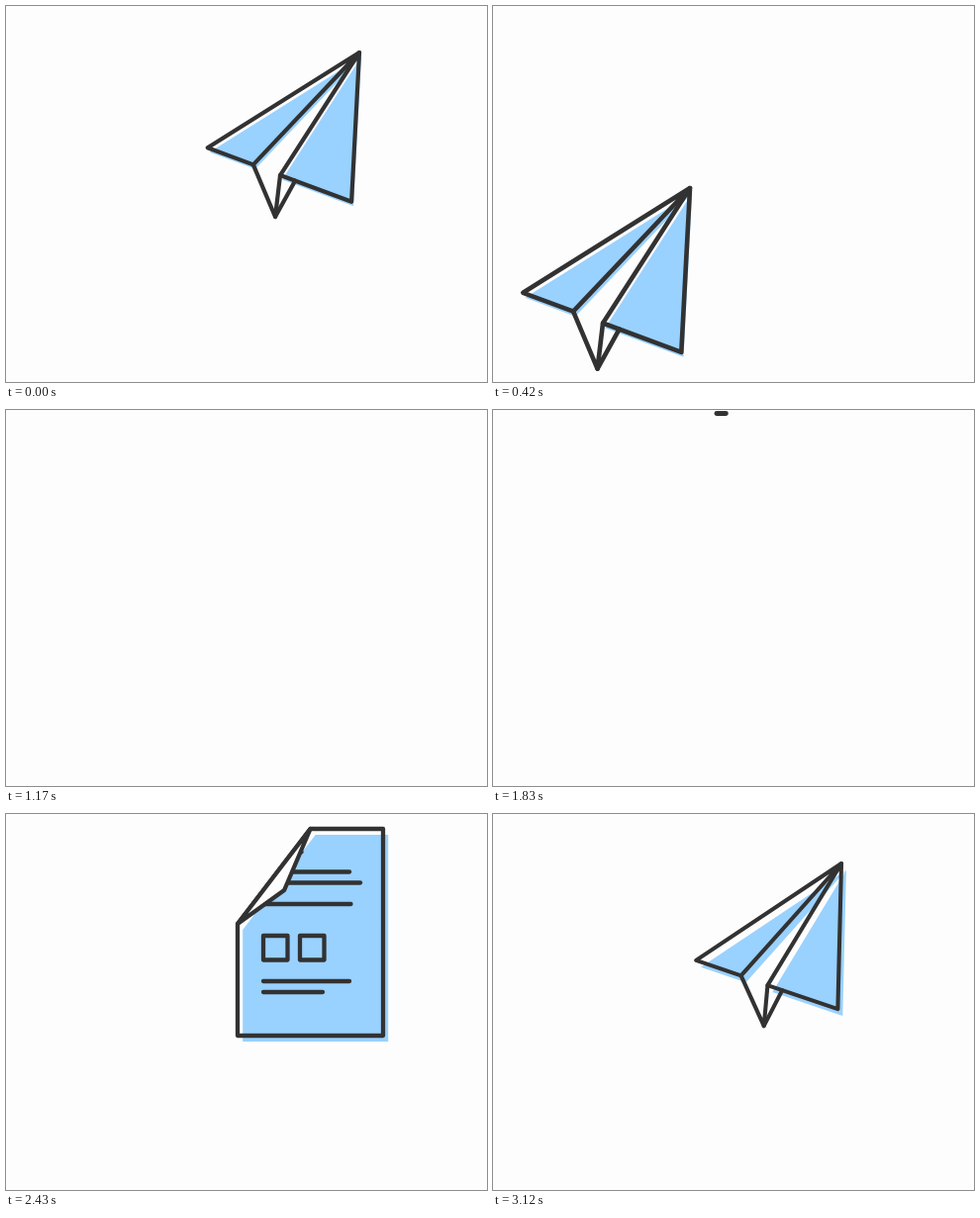
Recreate the animation shown at these times as an HTML page with a canvas. Size 486 by 380 pixels, loop 3.15 s.

```html
<!DOCTYPE html>
<html lang="en">
<head>
<meta charset="utf-8">
<title>Paper plane</title>
<style>
html, body { margin: 0; height: 100%; overflow: hidden; background: #fdfdfd; }
canvas { display: block; }
</style>
</head>
<body>
<canvas id="stage" width="486" height="380"></canvas>
<script>
const ctx = document.getElementById('stage').getContext('2d');
const LOOP = 3150, STEP = 30;
const INK = '#323232', BLUE = '#99d1ff', PAPER = '#fdfdfd';
const RAD = Math.PI / 180;

const lerp = (a, b, p) => a + (b - a) * p;
const span = (t, from, to) => Math.min(1, Math.max(0, (t - from) / (to - from)));
const ease = (t, from, to) => (1 - Math.cos(Math.PI * span(t, from, to))) / 2;

function trace(points, closed) {
  ctx.beginPath();
  points.forEach(([x, y]) => ctx.lineTo(x, y));
  if (closed) ctx.closePath();
}

function fill(points, color) {
  trace(points, true);
  ctx.fillStyle = color;
  ctx.fill();
}

// Strokes keep an even width even when the shape is squeezed.
function stroke(points, width, closed) {
  trace(points, closed);
  ctx.save();
  ctx.resetTransform();
  ctx.lineWidth = width;
  ctx.stroke();
  ctx.restore();
}

// The part of a polyline between two fractions of its length.
function trim(points, from, to) {
  const lengths = points.slice(1).map(([x, y], i) => Math.hypot(x - points[i][0], y - points[i][1]));
  const total = lengths.reduce((a, b) => a + b, 0);
  const start = from * total, end = to * total, part = [];
  let done = 0;
  lengths.forEach((len, i) => {
    const a = Math.max(start, done), b = Math.min(end, done + len);
    if (b > a) {
      for (const d of [a, b]) {
        const p = (d - done) / len;
        part.push([lerp(points[i][0], points[i + 1][0], p), lerp(points[i][1], points[i + 1][1], p)]);
      }
    }
    done += len;
  });
  return part;
}

// ---- Plane: corners as [distance, angle] from the nose ----
const LINE_ANGLE = 121.9, LINE_LENGTH = 187;

function drawPlane(x, y, { scale = 1, turn = 0, open = 1, wing = 151, shade = [2, 4.5] }) {
  const corner = (len, angle) => {
    const a = (lerp(LINE_ANGLE, angle, open) + turn) * RAD;
    return [x + Math.cos(a) * len * scale, y + Math.sin(a) * len * scale];
  };
  const nose = [x, y];
  const left = corner(181, 147.9), leftFold = corner(156, 133.4);
  const keel = corner(186.5, 117.1);
  const rightFold = corner(147.6, 122.8), right = corner(wing, 93);
  const under = corner(145, 116.6);
  const wings = [[nose, left, leftFold], [nose, rightFold, right]];
  const width = 4.2 * scale;

  for (const w of wings) {
    fill(w.map(([px, py]) => [px + shade[0] * open * scale, py + shade[1] * open * scale]), BLUE);
  }
  for (const w of wings) stroke(w, width, true);
  stroke([leftFold, keel, rightFold], width);
  stroke([keel, under], width);
}

function flight(t) {
  if (t <= 420) {
    const p = ease(t, 0, 420);
    drawPlane(lerp(357, 199, p), lerp(47, 184, p), { scale: lerp(1, 1.1, p) });
  } else if (t < 550) {
    const p = span(t, 420, 550) ** 2;
    drawPlane(lerp(199, 463, p), lerp(184, 9, p), { scale: 1.1 * (1 - p) });
  }
}

function unfold(t) {
  const settle = ease(t, 3000, 3120);
  drawPlane(lerp(357, 352, settle), lerp(44, 50, settle), {
    scale: lerp(1, 0.975, settle),
    turn: -1.6 * settle,
    open: ease(t, 2735, 3010),
    wing: lerp(LINE_LENGTH, 151, ease(t, 2940, 3040)),
    shade: [5, 7]
  });
}

// ---- Wind lines left behind ----
const WIND = [
  [560, 860, [440, 120], [290, 215]],
  [680, 1020, [430, 270], [262, 378]],
  [870, 1170, [380, 236], [208, 344]]
];

function wind(t) {
  for (const [from, to, a, b] of WIND) {
    const p = span(t, from, to);
    if (p > 0 && p < 1) {
      stroke(trim([a, b], span(p, 0.3, 1), span(p, 0, 0.7)), 4.2);
    }
  }
}

// ---- Page, in coordinates from its centre ----
const W = 73.5, H = 104.5, CUT = -8.5;
const row = (y, end) => [[-47.5, y], [end, y]];
const box = x => [[x, 3.5], [x + 24.5, 3.5], [x + 24.5, 28], [x, 28], [x, 3.5]];
const MARKS = [
  [1890, 120, row(-81, -9)], [1930, 120, row(-61, 39.5)], [1960, 120, row(-50, 50.5)],
  [2010, 120, row(-28.5, 41)], [2075, 160, box(-47.5)], [2105, 160, box(-10.5)],
  [2135, 120, row(49.5, 39.5)], [2165, 120, row(60.5, 12.5)]
];

// A corner curls along a quadratic curve towards the middle line.
function flap(p, side) {
  const q = 1 - p;
  const x = -W * q * q - 32 * p * q;
  const y = -H * q * q - 41 * p * q - 24.5 * p * p;
  return [[0, -H], [side * -x, y], [side * W, CUT]];
}

function page(t) {
  const scale = 1.11 - 0.11 * span(t, 1830, 2430) ** 1.5;
  const squeeze = ease(t, 2550, 2765);
  const foldLeft = span(t, 2340, 2520), foldRight = span(t, 2435, 2585);
  const width = 4.3 * scale;
  const outline = [
    ...(foldLeft ? [[0, -H]] : [[-W, -H]]),
    ...(foldRight ? [[0, -H], [W, CUT]] : [[W, -H]]),
    [W, H], [-W, H],
    ...(foldLeft ? [[-W, CUT]] : [])
  ];

  ctx.save();
  ctx.translate(307.5, lerp(119.5, 123.5, squeeze));
  ctx.rotate(31.9 * RAD * squeeze);
  ctx.scale(scale * (1 - squeeze), scale * lerp(1, 0.895, squeeze));

  const reveal = ease(t, 1890, 2215);
  if (reveal) {
    ctx.save();
    ctx.beginPath();
    ctx.arc(-125, -186.5, lerp(104, 364, reveal), 0, 7);
    ctx.clip();
    fill(outline.map(([x, y]) => [x + 5.2, y + 6]), BLUE);
    ctx.restore();
  }

  ctx.save();
  trace(outline, true);
  ctx.clip();
  for (const [from, time, points] of MARKS) {
    const p = ease(t, from, from + time);
    if (p) stroke(trim(points, 0, p), width);
  }
  ctx.restore();

  const drawn = ease(t, 1800, 2230);
  if (drawn < 1) stroke(trim([...outline, outline[0]], 0, drawn), width);
  else stroke(outline, width, true);

  for (const [p, side] of [[foldLeft, -1], [foldRight, 1]]) {
    if (!p) continue;
    const corner = flap(p, side);
    fill(corner, PAPER);
    stroke(corner, width, true);
  }
  ctx.restore();
}

function draw(now) {
  const t = Math.floor((now % LOOP) / STEP) * STEP;
  ctx.fillStyle = PAPER;
  ctx.fillRect(0, 0, 486, 380);
  ctx.strokeStyle = INK;
  ctx.lineCap = ctx.lineJoin = 'round';

  if (t < 1170) {
    flight(t);
    wind(t);
  } else if (t >= 2760) {
    unfold(t);
  } else if (t >= 1830) {
    page(t);
  }
}

const begin = performance.now();
function tick() {
  draw(performance.now() - begin);
  requestAnimationFrame(tick);
}
tick();
</script>
</body>
</html>
```
